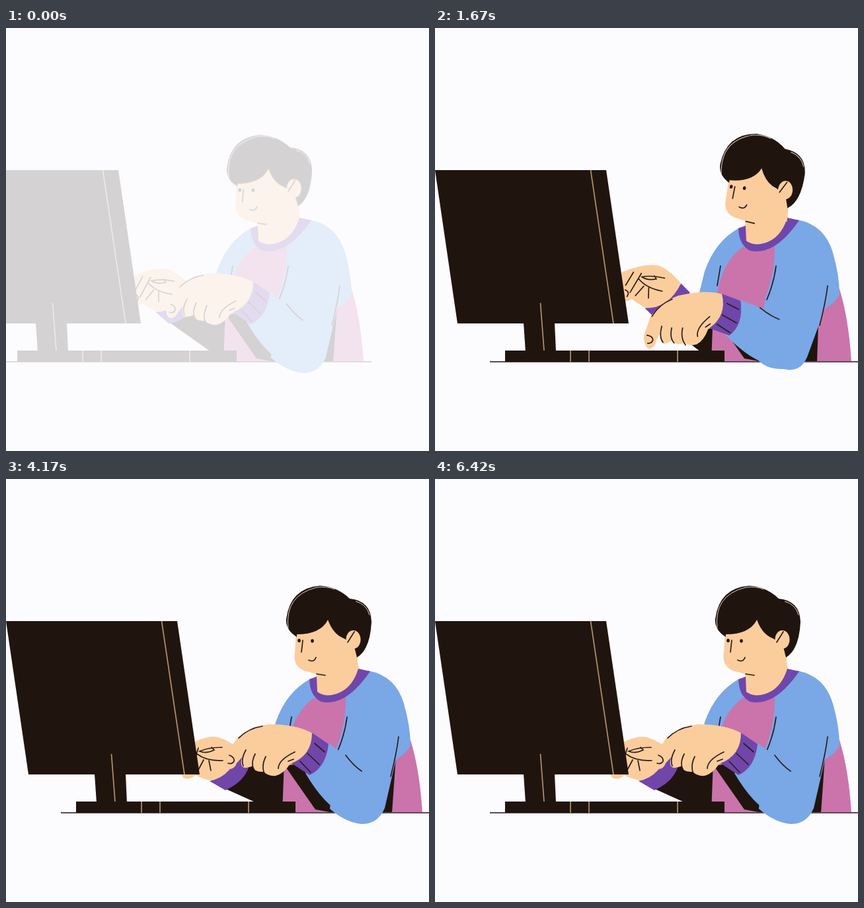
An HTML page for the animation above (6.51 s loop, 640 by 640 pixels).

```html
<!DOCTYPE html>
<html lang="en">
<head>
<meta charset="utf-8">
<title>Typing at a desk</title>
<style>
  html, body { margin: 0; width: 100%; height: 100%; overflow: hidden; background: #fcfcfe; }
  svg { display: block; width: 100%; height: 100%; }
  .dark { fill: #20150e; }
  .skin { fill: #fbcd9d; }
  .blue { fill: #7aa7e6; }
  .pink { fill: #ca74ab; }
  .purple { fill: #7046aa; }
  .ink, .tan { fill: none; stroke: #2a1d18; stroke-width: 1.7; stroke-linecap: round; }
  .tan { stroke: #b4906c; stroke-linecap: butt; }
</style>
</head>
<body>
<svg viewBox="0 0 640 640">
  <g id="scene">
    <g id="farArm">
      <path class="dark" d="M326 466L408 503L440 505L470 430L360 422Z"/>
      <path class="skin" d="M262 412Q300 385 322 391Q340 397 356 411Q350 450 312 457Q296 453 286 448Q278 457 268 452L260 430Z"/>
      <path class="purple" d="M308 457Q343 450 353 408L369 418Q372 452 332 471Z"/>
      <path class="ink" d="M279 408L272 430M291 407L281 439M327 406Q306 406 293 412Q303 416 315 410L311 406M289 416Q303 427 328 426M307 426L310 441M299 425L290 442M273 437Q281 438 278 446"/>
    </g>

    <path class="dark" d="M0 215H259L293 447H34Z"/>
    <path class="dark" d="M134 446H181L183 490H137Z"/>
    <path class="tan" d="M235.500 215L270 447M159.500 416L165 488"/>

    <path class="pink" d="M470 322L440 345L422 400L418 505H630Q626 440 612 395L545 300Z"/>
    <path class="blue" d="M461 302Q424 322 408 368L397 412H426Q431 356 466 331L476 334Z"/>
    <path class="ink" d="M432 360L427 390"/>
    <path class="dark" d="M422 434L468 500L495 505L530 500L450 430Z"/>
    <path class="dark" id="gap"/>

    <path fill="none" stroke="#5c4a58" stroke-width="1.800" d="M83 505H642"/>
    <path class="dark" d="M106 488H438V505H106Z"/>
    <path class="tan" d="M205 488V505M233 488V505M367 488V505"/>

    <path class="blue" id="upperArm"/>
    <path class="ink" d="M516 360Q513 385 502 411M594 390Q591 415 582 450"/>

    <path class="skin" d="M469 285L470 322Q495 336 520 315L534 289L530 262Z"/>
    <path class="purple" d="M459 303Q460 329 477 337Q514 345 551 291L533 287Q524 317 500 325Q482 331 471 322L470 299Z"/>

    <g id="head">
      <path class="skin" d="M440 220L437 262Q433 287 458 292L480 298L532 290V235L490 205Z"/>
      <path class="dark" d="M440 239Q423 229 424 212Q430 165 475 161.500Q502 163 520 181Q552 184 553 216Q551 258 531 270L526 250L511 241Q495 235 487 213Q476 235 440 235Z"/>
      <path fill="none" stroke="#d8cdc4" d="M427 227Q421 176 470 164Q486 162 497 167M529 185Q546 190 550 206"/>
      <ellipse class="skin" cx="525.500" cy="243" rx="11" ry="14"/>
      <path class="ink" d="M527 231L517 247M449 244L447 262M458 274Q466 278 469 270M470 295L483 297"/>
      <ellipse class="dark" cx="443.500" cy="244.500" rx="2.300" ry="2.800"/>
      <ellipse class="dark" cx="463.500" cy="245" rx="2.300" ry="2.800"/>
    </g>

    <g id="nearArm">
      <path class="blue" d="M487 399L514 418L560 440L555 488L515 508Q484 498 453 445Q470 425 487 399Z"/>
      <path class="skin" d="M464 385Q440 371 398 371Q368 375 349 393L333 418Q329 435 337 439Q346 439 349 430L357 421Q353 436 362 437Q370 436 373 434Q375 444 390 443Q397 450 408 449Q420 446 430 431L458 425Z"/>
      <path class="purple" d="M463 384L488 401Q484 437 459 448L432 430Q463 418 463 384Z"/>
      <path class="ink" d="M352 392Q367 377 388 374M363 410Q355 424 359 434M377 416Q370 430 375 439M393 420Q386 434 391 446M437 413Q412 425 412 438M427 427L435 424M338 418Q346 421 345 427Q342 432 336 430M467 400L482 413M456 415L474 432M445 427L461 444M514 418Q526 434 538 442"/>
    </g>
  </g>
</svg>
<script>
const el = id => document.getElementById(id);
const LOOP = 6510, STEP = 1000 / 12;

// Typing cycle: phase, near hand height, far hand height, hair edge
const poses = [
  [0, 371, 390, 424], [.18, 380, 402, 427], [.32, 390, 380, 428],
  [.5, 398, 362, 431], [.79, 376, 363, 430.5], [.92, 371, 367, 423], [1, 371, 390, 424]
];
// Pace of typing: step, cycles done
const pace = [[0, .92], [11, 2.32], [20, 3.5], [30, 5.18], [50, 8], [66, 9.79], [77, 11]];

function sample(keys, x) {
  let i = 1;
  while (i < keys.length - 1 && x > keys[i][0]) i++;
  const a = keys[i - 1], b = keys[i];
  const u = (x - a[0]) / (b[0] - a[0]);
  return a.slice(1).map((v, j) => v + (b[j + 1] - v) * u);
}

const rotate = (id, deg, x, y) =>
  el(id).setAttribute('transform', `rotate(${deg} ${x} ${y})`);

function draw(now) {
  const step = Math.min(77, Math.floor((now % LOOP) / STEP + .001));
  const [near, far, hair] = sample(poses, sample(pace, step)[0] % 1);
  const drop = (near - 371) / 27;

  rotate('nearArm', -13.75 * drop, 524, 513);
  rotate('farArm', (390 - far) * .475, 455, 480);
  rotate('head', (hair - 424) * .67, 500, 300);

  // The elbow swings left and up as the hand drops
  const e = 10 * drop;
  el('gap').setAttribute('d', `M${590 - .9 * e} 420L${584 - .6 * e} 505H550Z`);
  el('upperArm').setAttribute('d',
    `M548 290Q590 298 602 340Q612 375 612 403Q606 416 590 424L${573 - e} 498` +
    `Q${563 - e} 522 ${538 - e} ${522 - .6 * e}Q${514 - e} ${520 - .3 * e} 490 ${499 + .5 * e}` +
    `L495 440L500 407Q515 370 514 328Z`);

  // Slide and fade in
  const t = step * STEP;
  const slide = -89 * (1 - Math.min(1, t / 700)) ** 3;
  el('scene').setAttribute('transform', `translate(${slide} 0)`);
  el('scene').setAttribute('opacity', Math.min(1, .18 + t / 500));
}

const start = performance.now();
function tick() {
  draw(performance.now() - start);
  requestAnimationFrame(tick);
}
tick();
</script>
</body>
</html>
```
